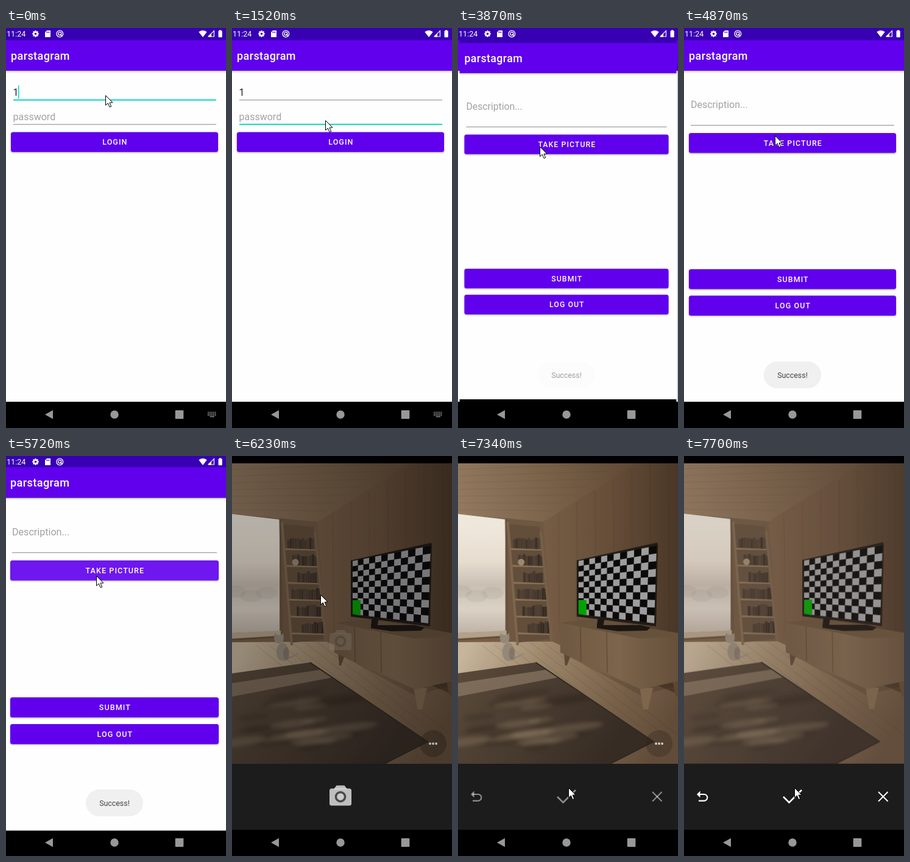
Recreate the animation shown at these times as an HTML page with a canvas. Size 361x655 px, loop 8000 ms.

```html
<!DOCTYPE html>
<html lang="en">
<head>
<meta charset="utf-8">
<title>Login and camera demo</title>
<style>
html, body { margin: 0; width: 100%; height: 100%; overflow: hidden; background: #000; }
canvas { display: block; width: 361px; height: 655px; }
</style>
</head>
<body>
<canvas id="stage"></canvas>
<script>
const W = 361, H = 655, LOOP = 8000;
const PURPLE = '#6000ed', DARK = '#3700b3', TEAL = '#03dac5', PAPER = '#fefefe', PANEL = '#1c1c1c';
const HINT = '#a2a2a2', INK = '#222', FONT = 'Roboto, "Noto Sans", sans-serif';
const dpr = window.devicePixelRatio || 1;

function makeCanvas(el) {
  el.width = W * dpr;
  el.height = H * dpr;
  const c = el.getContext('2d');
  c.scale(dpr, dpr);
  return c;
}
const screen = makeCanvas(document.getElementById('stage'));
let g = screen;

const clamp = v => Math.max(0, Math.min(1, v));
const ramp = (t, a, b) => clamp((t - a) / (b - a));
const mix = (a, b, k) => a + (b - a) * k;
const ease = k => k * k * (3 - 2 * k);

const beat = ms => Math.floor((ms + 20) / 124.3) * 125;

function rect(color, x, y, w, h) {
  g.fillStyle = color;
  g.fillRect(x, y, w, h);
}
function pill(color, x, y, w, h, r) {
  g.fillStyle = color;
  g.beginPath();
  g.roundRect(x, y, w, h, r);
  g.fill();
}
function disc(color, x, y, rx, ry = rx, turn = 0) {
  g.fillStyle = color;
  g.beginPath();
  g.ellipse(x, y, rx, ry, turn, 0, 7);
  g.fill();
}
function trace(pts) {
  g.beginPath();
  for (let i = 0; i < pts.length; i += 2) g.lineTo(pts[i], pts[i + 1]);
}
function poly(color, ...pts) {
  g.fillStyle = color;
  trace(pts);
  g.closePath();
  g.fill();
}
function line(color, width, ...pts) {
  g.strokeStyle = color;
  g.lineWidth = width;
  trace(pts);
  g.stroke();
}
function ring(color, width, x, y, r) {
  g.strokeStyle = color;
  g.lineWidth = width;
  g.beginPath();
  g.arc(x, y, r, 0, 7);
  g.stroke();
}
function grad(x0, y0, x1, y1, ...colors) {
  const f = g.createLinearGradient(x0, y0, x1, y1);
  colors.forEach((c, i) => f.addColorStop(i / (colors.length - 1), c));
  return f;
}
function text(str, x, y, size, color, { weight = 400, align = 'left', gap = 0 } = {}) {
  g.font = `${weight} ${size}px ${FONT}`;
  g.textAlign = align;
  g.letterSpacing = gap + 'px';
  g.fillStyle = color;
  g.fillText(str, x + (align === 'center' ? gap / 2 : 0), y);
  g.letterSpacing = '0px';
}
function layer(alpha, draw) {
  if (alpha <= 0) return;
  g.save();
  g.globalAlpha *= alpha;
  draw();
  g.restore();
}

// ---- system bars ----
function statusIcons() {
  const c = '#fff';
  text('11:24', 1, 14, 12.6, c);
  disc(c, 48.5, 9.5, 4);
  for (let a = 0; a < 6; a += Math.PI / 4) disc(c, 48.5 + Math.cos(a) * 4.2, 9.5 + Math.sin(a) * 4.2, 1.3);
  disc(DARK, 48.5, 9.5, 1.8);
  poly(c, 67, 4, 73, 4, 73, 15, 64, 15, 64, 7);
  for (let i = 0; i < 3; i++) rect(DARK, 66.3 + i * 2, 5.8, 1, 2.4);
  ring(c, 1.3, 88.3, 9.5, 5.4);
  ring(c, 1.3, 88.3, 9.2, 2.6);
  line(c, 1.3, 89, 10, 92, 13.3);
  g.beginPath();
  g.moveTo(323, 15);
  g.lineTo(316.3, 6.4);
  g.quadraticCurveTo(323, 1.6, 329.7, 6.4);
  g.fillStyle = c;
  g.fill();
  line(c, 1.2, 332, 14, 341.4, 14, 341.4, 4.6, 331.6, 14.2);
  poly(c, 331.6, 14.5, 337, 9.2, 337, 14.5);
  pill(c, 348.5, 4.6, 6.2, 10.6, 1);
  rect(c, 350, 3.4, 3.2, 2);
}
function navIcons(keyboard) {
  const c = '#989898';
  poly(c, 64, 633, 77, 625.8, 77, 640.2);
  disc(c, 178, 633, 6.7);
  pill(c, 277.7, 626, 13.6, 14, 1);
  if (!keyboard) return;
  for (let i = 0; i < 15; i++) rect(c, 331 + i % 5 * 2.9, 628.6 + Math.floor(i / 5) * 2.4, 1.8, 1.5);
  rect(c, 334.5, 635.8, 7.5, 1.3);
}

// ---- app pages ----
function page() {
  rect(PAPER, 0, 70, W, 542);
  rect(grad(0, 70, 0, 74, 'rgba(0,0,0,.2)', 'rgba(0,0,0,0)'), 0, 70, W, 4);
  rect(DARK, 0, 0, W, 20);
  rect(PURPLE, 0, 20, W, 50);
  text('parstagram', 8, 52, 18, '#fff', { weight: 500, gap: .4 });
}
function button(label, y, ripple = 0, px = 0, py = 0) {
  const h = 32.6;
  g.save();
  g.shadowColor = 'rgba(0,0,0,.32)';
  g.shadowBlur = 2.5 * dpr;
  g.shadowOffsetY = 1.2 * dpr;
  pill(PURPLE, 8, y, 340, h, 3.5);
  g.restore();
  if (ripple > 0) {
    g.save();
    g.beginPath();
    g.roundRect(8, y, 340, h, 3.5);
    g.clip();
    disc('rgba(255,255,255,.09)', px, py, 230 * ripple);
    g.restore();
  }
  text(label, 178.3, y + h / 2 + 4.5, 12.45, '#fff', { weight: 500, align: 'center', gap: 1.1 });
}
function field(y, value, hint, focus, caret) {
  text(value || hint, 11.5, y + 6, 16, value ? INK : HINT);
  rect('#858585', 12, y + 12.4, 333, 1);
  layer(focus, () => rect(TEAL, 12, y + 11.8, 333, 1.8));
  if (caret) rect(TEAL, value ? 20 : 11.4, y - 11, 1.5, 21.5);
}
function loginPage(t) {
  const second = ramp(t, 750, 1000);
  const since = t < 875 ? t + 125 : t < 2000 ? t - 875 : t - 2000;
  const caret = since % 1000 < 500;
  page();
  field(105, '1', '', 1 - second, caret && !second);
  field(145, t < 2000 ? '' : '2', 'password', second, caret && second);
  button('LOGIN', 170.5, ramp(t, 3125, 3500), 134, 194);
}
function mainPage(t) {
  page();
  text('Description...', 11, 131, 16, HINT);
  rect('#858585', 11, 158.8, 334, 1);
  button('TAKE PICTURE', 172, ramp(t, 5125, 5625), 148, 196);
  button('SUBMIT', 395);
  button('LOG OUT', 438.3);
  rect('#000', 0, 612, W, 43);
}
function scaled(k, draw) {
  g.save();
  g.translate(178, 341);
  g.scale(k, k);
  g.translate(-178, -341);
  draw();
  g.restore();
}
function toast(t) {
  const k = ramp(t, 3750, 4000);
  layer(k ** 3, () => pill('#f0f0f0', 131, 546, 94, 44, 22));
  layer(k, () => text('Success!', 178, 573, 12.4, '#444', { align: 'center' }));
}

// ---- camera ----
function drawRoom() {
  let seed = 7;
  const rnd = () => (seed = seed * 16807 % 2147483647) / 2147483647;
  g.save();
  g.beginPath();
  g.rect(0, 12, W, 492);
  g.clip();

  rect(grad(140, 0, 361, 0, '#785d45', '#664d38', '#493525'), 0, 12, W, 492);
  poly(grad(0, 90, 300, 12, '#957b61', '#7b6249', '#5d4632'), 0, 12, 292, 12, 140, 108, 0, 95);
  for (let i = 0; i < 7; i++) {
    line('rgba(50,35,20,.1)', 1, 0, 22 + i * 11, 265 - i * 18, 12 + i * 13);
    line('rgba(40,25,12,.14)', 1, 165 + i * 30, 92 - i * 17, 167 + i * 30, 290);
  }
  poly('#705740', 78, 102, 140, 108, 155, 306, 78, 306);

  // floor
  poly(grad(20, 310, 330, 480, '#cbb99f', '#9f886c', '#7d654c', '#614b38'), 0, 305, 155, 304, 361, 390, 361, 504, 0, 504);
  for (let i = 0; i < 7; i++) line('rgba(60,42,25,.2)', 1, 40 + i * 20, 310 - i, 150 + i * 38, 398 + i * 12);

  // window
  poly(grad(0, 95, 0, 290, '#f6f0e4', '#f4ecdf', '#eee4d6', '#cfc4b8', '#e2d9cd', '#c4b8aa'), 0, 95, 78, 104, 78, 287, 0, 290);
  for (let x = 5; x < 78; x += 26) disc('rgba(150,138,128,.15)', x, 222 + rnd() * 8, 18, 10);
  poly('#b7a58d', 0, 290, 80, 286, 80, 294, 0, 299);
  line('#604b36', 2, 0, 301, 82, 296);
  line('#65503a', 3, 79, 104, 82, 292);

  // ladder shelf
  poly('#624d39', 84, 112, 134, 116, 150, 300, 96, 306);
  for (let i = 0; i < 6; i++) {
    const y = 153 + i * 27.6, left = 83 + (y - 108) * .085, right = 136 + (y - 125) * .1;
    for (let x = left + 4 + i % 3 * 6; x < right - 5; x += 4) {
      const h = 15 + rnd() * 5;
      rect(`hsl(26 22% ${16 + rnd() * 10}%)`, x, y - h, 3.6, h);
    }
    poly('#8d745a', left, y - 2, right, y, right, y + 2, left, y + 1);
  }
  disc('#a08b73', 104, 174, 5.5);
  line('#7f674e', 4, 82, 108, 98, 310);
  line('#78604a', 4, 136, 124, 154, 304);

  // cat
  const fur = '#978a7b';
  disc(fur, 83, 321, 10, 15);
  disc(fur, 77, 300, 7.5, 7);
  poly(fur, 69, 300, 70, 290, 76, 294);
  poly(fur, 79, 294, 84, 290, 85, 300);
  line(fur, 3, 90, 332, 100, 328, 108, 324);
  disc('rgba(80,65,48,.25)', 89, 324, 5, 11);

  // rug
  const rug = [0, 356, 128, 338, 321, 468, 250, 504, 0, 504];
  poly(grad(0, 340, 240, 504, '#5a493a', '#483a2e', '#342922'), ...rug);
  g.save();
  trace(rug);
  g.clip();
  poly('rgba(175,155,130,.45)', 0, 372, 145, 350, 168, 362, 0, 394);
  g.filter = 'blur(3px)';
  for (let i = 0; i < 22; i++) {
    const tone = i % 2 ? 'rgba(160,138,112,.3)' : 'rgba(30,22,17,.2)';
    disc(tone, rnd() * 190, 385 + rnd() * 95, 20 + rnd() * 35, 3 + rnd() * 4, -.13);
  }
  g.restore();
  line('#2e251f', 2, ...rug.slice(2, 8));

  // cabinet
  poly('rgba(40,27,17,.2)', 170, 322, 305, 380, 361, 369, 361, 376, 300, 392);
  poly('#5d4733', 174, 322, 185, 327, 179, 343, 176, 343);
  poly('#7e664b', 298, 378, 320, 380, 312, 415, 304, 415);
  poly('#5c4632', 352, 368, 361, 366, 361, 394, 357, 394);
  poly(grad(168, 0, 361, 0, '#705841', '#7e654c', '#664f3a'), 168, 273, 298, 297, 361, 293, 361, 369, 300, 382, 168, 322);
  poly('#66503a', 168, 273, 228, 267, 361, 290, 361, 296, 298, 299);
  line('rgba(45,31,19,.5)', 1, 201, 280, 202, 337);
  line('rgba(45,31,19,.5)', 1, 244, 288, 245, 355);

  // television
  poly('#17120e', 230, 262, 241, 264, 238, 281, 228, 278);
  poly('#17120e', 228, 277, 300, 277, 316, 281, 310, 286, 262, 287, 228, 282);
  poly('#1d1711', 195, 171, 327, 142, 328, 146, 325, 279, 195, 263);
  const at = (u, v) => {
    const k = u * (.8 + .2 * u);
    return [mix(198, mix(326, 322, v), k), mix(mix(172, 259, v), mix(147, 274, v), k)];
  };
  const cols = 12, rows = 10;
  for (let c = 0; c < cols; c++)
    for (let r = 0; r < rows; r++) {
      const u = c / cols, v = r / rows, u2 = u + 1 / cols, v2 = v + 1 / rows;
      poly((c + r) % 2 ? '#050505' : '#a0a0a3', ...at(u, v2), ...at(u2, v2), ...at(u2, v), ...at(u, v));
    }
  poly('#00a400', 198, 236, 211, 236, 211, 261, 198, 259);
  g.restore();
}
const roomCanvas = document.createElement('canvas');
g = makeCanvas(roomCanvas);
g.save();
drawRoom();
g.restore();
g = screen;

function cameraIcon(x, y, color, hole) {
  pill(color, x - 18, y - 12, 36, 28, 3.5);
  poly(color, x - 11, y - 11, x - 6.5, y - 17, x + 6.5, y - 17, x + 11, y - 11);
  disc(hole, x, y + 1.5, 9.3);
  disc(color, x, y + 1.5, 5.8);
}
function reviewIcons() {
  const c = '#fff';
  g.strokeStyle = c;
  g.lineWidth = 2.1;
  g.beginPath();
  g.moveTo(24, 554);
  g.lineTo(33, 554);
  g.arc(33, 559.3, 5.3, -Math.PI / 2, Math.PI / 2);
  g.lineTo(24, 564.6);
  g.stroke();
  poly(c, 26.5, 548.5, 21, 554, 26.5, 559.5);
  line(c, 2.6, 163, 558, 172.5, 567.5, 193, 547);
  line(c, 2, 319, 550, 334.5, 565.5);
  line(c, 2, 334.5, 550, 319, 565.5);
}
function cameraPage(t) {
  const review = ramp(t, 7250, 7750);
  g.drawImage(roomCanvas, -2 * review, -review, W + 2 * review, H + review);
  rect('#000', 0, 0, W, 12);
  layer(review, () => rect('rgba(104,92,80,.2)', 0, 12, W, 492));
  rect(PANEL, 0, 504, W, 108);
  rect('#000', 0, 612, W, 43);

  layer(1 - review, () => {
    disc('rgba(45,35,28,.4)', 330, 471, 22);
    for (let i = -1; i < 2; i++) disc('#fff', 330 + i * 5, 471, 1.9);
  });
  layer((1 - ramp(t, 6000, 6500)) ** 1.8, () => {
    rect('#141414', 0, 12, W, 492);
    cameraIcon(178, 302, '#8a7d6e', '#2b2520');
  });
  const shutter = ramp(t, 5875, 6400) * (1 - ramp(t, 7000, 7250));
  layer(shutter, () => cameraIcon(178, 556.5, '#fff', PANEL));
  layer(ramp(t, 7250, 7500), reviewIcons);
}

// Each move: arrival time, duration, end point.
const MOVES = [[125, 125, 149, 130], [625, 125, 153, 151], [2625, 500, 134, 194], [4375, 375, 134, 216],
  [4750, 250, 150, 155], [5000, 250, 148, 196], [6250, 250, 145, 227], [6875, 625, 181, 549], [7375, 125, 181, 543]];

function pointer(t) {
  let x = 163, y = 110;
  for (const [end, span, tx, ty] of MOVES) {
    const k = ease(ramp(t, end - span, end));
    x = mix(x, tx, k);
    y = mix(y, ty, k);
  }
  g.save();
  g.translate(Math.round(x) + .5, Math.round(y) + .5);
  g.lineJoin = 'round';
  poly('#fff', 0, 0, 0, 16, 3.8, 12.6, 6.6, 19, 9.2, 17.9, 6.5, 11.7, 11.5, 11.5);
  g.strokeStyle = '#000';
  g.lineWidth = 1;
  g.stroke();
  g.restore();
}

function draw(t) {
  rect('#000', 0, 0, W, H);
  if (t >= 6000) cameraPage(t);
  else {
    if (t < 4250) loginPage(t);
    const opening = ramp(t, 3625, 3875);
    layer(opening, () => scaled(1 - .07 * Math.exp((3750 - t) / 80) + .006 * ramp(t, 5625, 5750), () => mainPage(t)));
    if (opening && t < 4000) rect('rgba(0,0,0,.25)', 359.6, 58, 1.4, 567);
    toast(t);
    statusIcons();
  }
  navIcons(t < 3750);
  pointer(t);
}

function tick(now) {
  draw(beat(now % LOOP));
  requestAnimationFrame(tick);
}
draw(0);
requestAnimationFrame(tick);
</script>
</body>
</html>
```
